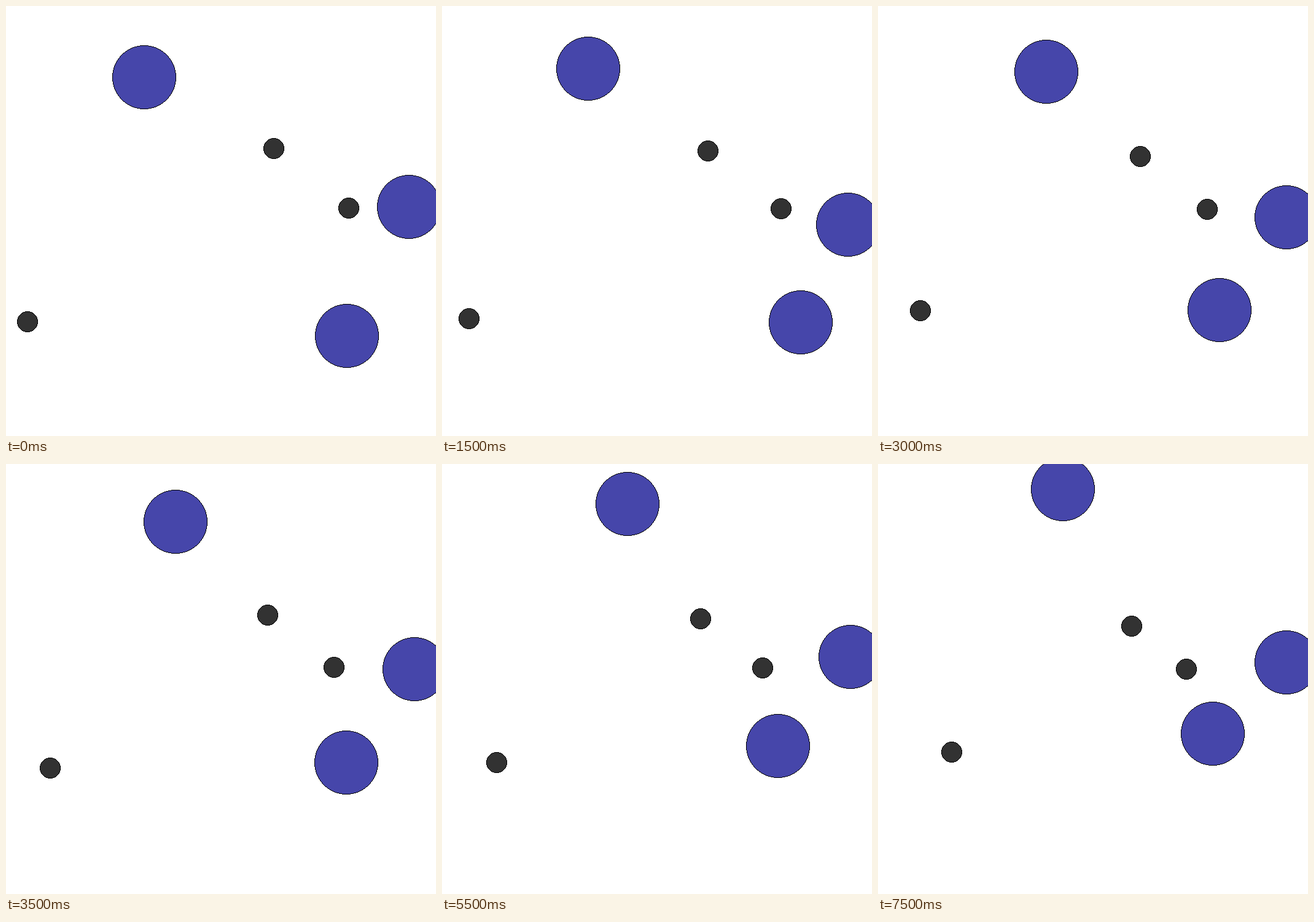
Write an HTML page with a canvas that moves like this. It is 700 by 700 pixels and loops after 8 s.

```html
<!DOCTYPE html>
<html lang="en">
<head>
<meta charset="utf-8">
<title>Moving discs</title>
<style>
  html, body { margin: 0; height: 100%; overflow: hidden; background: #fff; }
  canvas { display: block; }
</style>
</head>
<body>
<canvas width="700" height="700"></canvas>
<script>
const STEP = 500, LOOP = 8000;
const ctx = document.querySelector('canvas').getContext('2d');

// Key points of the discs: [step, x, y]
const discs = [
  [[0, 225, 116], [2, 225, 87], [4, 250, 116], [6, 274, 107],
   [9, 279, 67], [11, 302, 65], [13, 291, 44], [15, 301, 41]],
  [[0, 656, 327], [2, 656, 356], [4, 665, 356], [6, 665, 344],
   [9, 665, 313], [13, 665, 314], [15, 665, 323]],
  [[0, 555, 537], [2, 584, 537], [3, 584, 515], [4, 584, 512],
   [6, 556, 495], [9, 550, 468], [13, 543, 449], [15, 545, 439]]
];

// The dots all close in on one centre; pull is the share of the way: [step, share]
const dots = [[35, 514], [436, 232], [558, 329]];
const centre = [350, 349];
const pull = [[0, 0], [2, 0], [4, 0.06], [6, 0.108], [9, 0.1365],
              [10, 0.171], [12, 0.171], [13, 0.2], [15, 0.27]];

const mix = (a, b, f) => a.map((v, i) => v + (b[i] - v) * f);

function along(keys, step) {
  const i = Math.max(1, keys.findIndex(key => key[0] >= step));
  const [t0, ...a] = keys[i - 1], [t1, ...b] = keys[i];
  return mix(a, b, (step - t0) / (t1 - t0));
}

// Calls plot(x, y) for the pixel centres of one eighth of a circle, both ways round
function eighths(r, plot) {
  for (let x = 0.5; x <= r * Math.SQRT1_2 + 0.5; x++) {
    const y = Math.round(Math.sqrt(r * r - x * x) - 0.5) + 0.5;
    plot(x, y);
    plot(y, x);
  }
}

// Hard-edged circle with an outline one pixel wide
function circle([cx, cy], r, color) {
  cx = Math.round(cx) - 0.5;
  cy = Math.round(cy) - 0.5;
  ctx.fillStyle = color;
  eighths(r, (x, y) => {
    for (const v of [-y, y]) ctx.fillRect(cx - x, cy + v, 2 * x + 1, 1);
  });
  ctx.fillStyle = '#000';
  eighths(r, (x, y) => {
    for (const u of [-x, x])
      for (const v of [-y, y]) ctx.fillRect(cx + u, cy + v, 1, 1);
  });
}

function draw() {
  const step = Math.floor(performance.now() % LOOP / STEP);
  const [share] = along(pull, step);
  ctx.clearRect(0, 0, 700, 700);
  discs.forEach(keys => circle(along(keys, step), 51.5, '#4646aa'));
  dots.forEach(start => circle(mix(start, centre, share), 16.5, '#323232'));
  requestAnimationFrame(draw);
}
draw();
</script>
</body>
</html>
```
